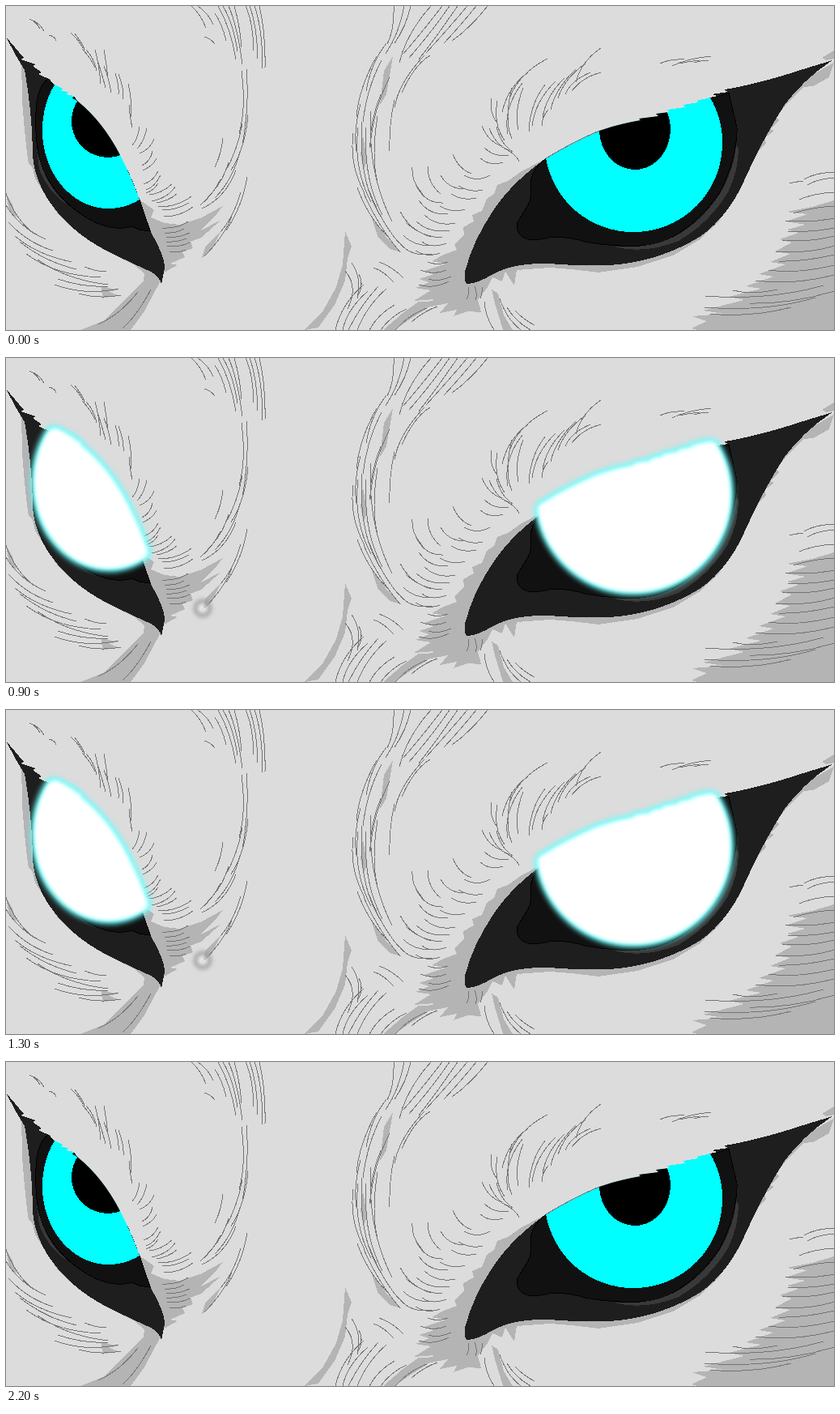
An HTML page that plays this animation: 1023 px wide and 400 px high, repeating every 2300 ms.

```html
<!DOCTYPE html>
<html lang="en">
<head>
<meta charset="utf-8">
<title>Glowing eyes</title>
<style>
  html, body { margin: 0; width: 100%; height: 100%; overflow: hidden; background: #dcdcdc; }
  svg { display: block; }
  .art { shape-rendering: crispEdges; }
  .shade { fill: #b4b4b4; }
  .fur { fill: none; stroke: #747474; }
  .socket { fill: #1e1e1e; }
  .inner { fill: #111; stroke: #000; }
  .rim { fill: #393939; }
  .iris { fill: #0ff; }
  .glow { stroke-linejoin: round; }
</style>
</head>
<body>
<svg width="1023" height="400" viewBox="0 0 1023 400">
  <defs>
    <filter id="flash1" filterUnits="userSpaceOnUse" x="0" y="0" width="1023" height="400" color-interpolation-filters="sRGB">
      <feComponentTransfer class="brighten"/>
    </filter>
    <filter id="flash2" filterUnits="userSpaceOnUse" x="0" y="0" width="1023" height="400" color-interpolation-filters="sRGB">
      <feComponentTransfer class="brighten"/>
      <feComponentTransfer class="brighten"/>
    </filter>
    <path id="leftIris" d="M60 97A82 97 0 0 0 165 239Q155 211 141 184Q120 143 88 117L82 114 84 111 75 109 77 106 68 105 70 102Z"/>
    <path id="rightIris" d="M667 188A109 110 0 0 0 776 279A109 110 0 0 0 870 113L853 117 855 119 837 122 839 125 817 128 819 131 803 133 806 136 782 139 784 141Q755 146 733 154Q700 168 667 188Z"/>
    <clipPath id="leftClip"><use href="#leftIris"/></clipPath>
    <clipPath id="rightClip"><use href="#rightIris"/></clipPath>
  </defs>
  <g id="scene">
    <rect width="1023" height="400" fill="#dcdcdc"/>
    <g class="art">
      <g class="shade">
        <path d="M0 42L18 66Q20 90 20 118Q24 170 28 195L33 200 36 213 62 254 75 268 96 284 130 305 159 320 171 330 170 339 157 353 135 374 122 388 92 400H154L171 377 184 352 192 338 182 310 120 270 60 220 35 140 26 78Z"/>
        <path d="M165 239L183 252 179 261 196 268 214 270 240 262 268 247 257 261 239 278 266 264 241 286 228 291 231 299 218 304 221 310 203 318 212 320 195 329Z"/>
        <path d="M266 277L247 296 242 311 255 299ZM0 232L8 245 14 263 4 252ZM118 346L140 351 126 352 138 357 119 361Z"/>
        <path d="M419 278L427 297 422 312 419 339 406 369 386 397 369 400 392 376 408 347 416 319Z"/>
        <path d="M478 62L467 80 462 122 470 109ZM452 262L473 289 488 304 474 300 459 284ZM441 159L446 190 442 203 438 184Z"/>
        <path d="M662 191L637 204 620 216 607 221 603 232 594 238 588 253 576 258 578 266 565 273 566 282 554 294 557 301 541 307 526 315 543 318 516 327 528 331 510 337 523 341 506 348 525 351 504 364 529 362 515 373 546 367 536 379 557 375 553 383 570 377 587 378 583 363 595 347 601 335 613 340 617 328 628 345 631 326 672 323 699 325 732 329 780 322 824 308 856 289 884 263 760 300 600 315Z"/>
        <path d="M510 365L489 380 466 400H480L500 386 535 364ZM600 350L604 367 614 400H626L615 382 608 355Z"/>
        <path d="M1023 70L1017 88 997 99 985 100 963 123 952 137 955 141 944 152 949 154 937 163 939 169 928 180 917 185 913 203 898 233 894 235 900 210 924 170 949 130 985 91Z"/>
        <path d="M1023 55L1008 64 1014 67 1023 65Z"/>
        <path d="M1023 240L996 248 964 254 990 257 963 266 988 270 965 276 979 280 956 288 971 292 950 303 969 306 944 316 963 319 930 331 948 334 914 346 933 349 893 359 912 363 861 376 887 380 847 383 866 389 847 398 855 400H1023Z"/>
      </g>
      <g class="fur">
        <!-- left brow and inner corner -->
        <path d="M29 16q8 3 13 12M34 18q9 5 13 13M53 36q7 1 9 7M80 33q10 9 15 19M85 34q11 14 12 21M94 53q10 10 16 23M99 54q10 11 13 26M110 54q5 18 7 42M114 70q6 19 9 31M121 54q3 17 5 35M121 74q6 15 9 33M135 83q5 16 4 26M139 84q7 18 6 31M151 96q5 20 3 41M152 122q1 16 4 28M165 149q-2 15-9 23M174 151q-4 18-12 25M183 164q-5 13-18 18M181 179q-2 12-13 18M186 188q-4 9-17 15"/>
        <path d="M188 204q-6 12-18 16M191 209q-8 15-18 18M188 219q-6 9-15 12M205 220q-14 12-28 13M209 223q-9 14-29 18M211 232q-11 9-25 11M229 235q-17 13-41 13M226 243q-15 9-33 9M231 248q-16 12-36 12M225 266q-11 9-32 8M220 275q-10 6-24 5M227 280q-15 7-29 5M223 287q-13 5-25 4M227 292q-16 7-28 4M222 301q-9 4-20 2"/>
        <!-- forehead, left side -->
        <path d="M229 0q12 11 18 27M237 0q14 10 19 23M245 38q8 2 13 9M258 9q9 13 14 34M262 0q16 28 22 66M268 0q13 22 18 56M275 0q11 25 17 72M282 0q7 24 9 51M296 0q9 19 10 55M301 0q9 24 10 65M307 0q10 28 10 77M313 0q8 34 7 76M291 80q6 44-3 78M297 78q4 45-5 93M299 134q-3 41-21 69M292 145q-6 34-22 61M268 163q-2 20-10 36M289 180q-9 35-31 57M275 193q-8 27-26 43M284 203q-13 34-42 47M265 214q-10 20-25 32M298 211q-6 37-26 66M290 230q-8 29-25 49M279 260q-10 25-34 49"/>
        <!-- forehead, right side -->
        <path d="M479 0q1 29-8 47M492 0q-6 34-23 59M500 0q-6 26-20 46M525 0q-30 33-39 70M539 0q-23 30-48 59M548 0q-22 32-50 64M558 0q-23 34-48 66M570 0q-27 32-51 58M581 0q-21 26-40 46M595 0q-21 27-44 43M517 61q-31 32-37 64M524 61q-20 12-35 46M480 116q-7 30-6 63"/>
        <path d="M470 46q-19 24-25 59M464 67q-18 34-23 76M458 62q-22 39-25 75M474 88q-21 41-24 86M463 109q-14 35-13 66M438 121q-9 33-5 58M429 157q-5 39 14 74M435 150q-6 51 16 92M440 143q-5 72 22 115M445 150q-4 63 20 108M451 130q-5 75 26 136M459 136q-8 50 0 82M434 224q13 36 37 60M442 231q17 40 45 73M449 229q15 39 37 64"/>
        <!-- between nose and right eye -->
        <path d="M502 199q-1 19 13 33M521 198q0 21 16 34M507 222q11 22 33 21M552 183q7 18 23 24M537 209q9 16 28 17M566 209q16 9 32 0M559 222q15 9 30 5M510 240q14 20 36 16M550 232q14 9 31 5M517 258q16 15 38 10M487 254q13 24 38 31M494 267q18 18 45 19M507 266q16 15 41 11M491 283q14 15 38 12M485 291q15 20 42 15M514 291q12 9 30 2M536 247q15 9 31 4M506 302q15 9 30 3M521 316q12 5 25 0M512 326q16 7 32 0M522 337q12 4 28-3M510 344q17 6 37-4"/>
        <!-- right brow -->
        <path d="M669 65q-35 18-46 47M645 82q-25 18-32 49M638 95q-24 31-18 63M600 114q-3 18 6 29M607 117q-5 30 9 49M625 101q-10 40 0 63M639 101q-11 27-6 52M588 148q8 20 25 25M597 151q9 22 24 27M606 149q5 21 20 31M591 175q12 12 30 9M586 188q12 10 28 5M618 177q12 6 16 15M735 52q-24 16-31 42M716 71q-26 18-34 43M704 78q-26 25-31 50M690 89q-22 21-27 48M679 93q-25 24-29 55M666 97q-19 25-20 58M735 82q-23 6-36 23M722 82q-24 10-31 27M670 128q-8 9-8 20"/>
        <path d="M808 71q13-6 30-5M823 74q18-9 48-12M832 71q14-3 25-4M850 70q10-3 18-3"/>
        <!-- right cheek -->
        <path d="M1023 205q-24 1-37 9M985 217q-9-1-17 2M1023 212q-22 2-33 9M1023 230q-24 1-43 9M1023 247q-25 1-50 9M1023 262q-28 6-60 3M1023 274q-28 6-57 4M1023 284q-30 8-64 5M1023 296q-30 10-72 7M1023 307q-37 9-69 8M1023 320q-45 11-81 6M1023 332q-50 13-97 7M1010 345q-68 19-146 13M1000 360q-60 18-137 12M970 372q-51 13-100 8M1023 352q-51 16-105 15M953 350q-31 7-55 1"/>
        <!-- left cheek -->
        <path d="M0 231q10 30 34 50M0 246q16 27 49 42M3 267q23 25 55 35M11 284q27 23 70 32M17 291q31 25 70 34M25 306q36 27 92 29M39 313q36 25 87 31M60 344q38 14 79 5M64 337q33 11 62 9M90 355q25 7 52 2M97 322q15 6 27 6M163 353q-22 28-49 40M179 350q-17 32-35 48"/>
        <!-- muzzle -->
        <path d="M427 317q13 18 7 44M419 327q17 20 3 47M436 331q7 13-2 28M442 344q-28 24-35 56M447 352q-26 23-31 48M460 346q-23 25-37 54M470 349q-24 21-36 51M480 369q-21 12-31 31M495 374q-20 9-32 26M520 373q-22 8-39 27M533 371q-17 6-32 19M454 323q14 5 25 18M461 316q17 6 30 20M571 347q2 9-2 15M579 346q4 9 1 17M588 347q1 8-2 14M610 361q8 25 26 39M619 372q10 17 29 28M629 376q10 11 24 18M591 365q1 18 12 35"/>
      </g>
      <!-- left eye -->
      <path class="socket" d="M0 38L22 64 18 66 37 72 33 74 44 82 40 84 55 91 53 94 60 97 70 102 68 105 77 106 75 109 84 111 88 117Q120 143 141 184Q157 214 165 239L180 281Q197 311 196 324L192 343Q189 333 179 328Q154 317 124 302Q76 277 50 236Q33 207 33 180Q32 129 23 79L11 59Z"/>
      <path class="inner" d="M52 90Q38 100 37 130Q35 176 46 203Q64 239 96 259Q122 276 145 274Q158 271 164 276L178 278 165 239 88 130Z"/>
      <path class="rim" d="M38 176Q45 212 67 237L78 247Q51 229 41 201Z"/>
      <use class="iris" href="#leftIris"/>
      <circle cx="126" cy="142" r="45" clip-path="url(#leftClip)"/>
      <!-- right eye -->
      <path class="socket" d="M1021 67L985 78Q940 93 895 102L887 103 892 106 872 109 879 111 870 113 853 117 855 119 837 122 839 125 817 128 819 131 803 133 806 136 782 139 784 141Q755 146 733 154Q700 168 667 188Q626 217 603 251Q577 289 567 328Q566 344 571 343Q583 342 600 332Q626 317 670 318Q706 321 744 320Q804 317 857 285Q890 262 910 220Q936 162 962 122Q986 90 1021 67Z"/>
      <path class="inner" d="M666 189Q652 198 648 217Q651 238 643 249L632 267Q629 283 645 288Q658 290 674 285Q696 285 715 291Q766 300 805 294Q854 274 883 228Q904 185 903 150L893 107 860 118Z"/>
      <path class="rim" d="M902 171Q900 201 882 232Q850 280 804 293Q780 299 752 297Q788 307 831 290Q870 267 892 230Q905 203 905 176Z"/>
      <use class="iris" href="#rightIris"/>
      <ellipse cx="777" cy="152" rx="44" ry="50" clip-path="url(#rightClip)"/>
      <path class="fur" d="M667 188Q700 168 733 154"/>
    </g>
    <g class="glow" id="halo"><use href="#leftIris"/><use href="#rightIris"/></g>
    <g class="glow" id="core"><use href="#leftIris"/><use href="#rightIris"/></g>
  </g>
  <g id="spark" style="filter: blur(2px)">
    <circle cx="243" cy="309" r="9" fill="none" stroke="#999" stroke-width="6"/>
    <circle id="sparkCore" cx="243" cy="309" r="5" fill="#f4f4f4"/>
  </g>
</svg>
<script>
const FRAME = 100, FRAMES = 23, PEAK = 11;
const byId = id => document.getElementById(id);
const [scene, halo, core, spark, sparkCore] = ['scene', 'halo', 'core', 'spark', 'sparkCore'].map(byId);

// Interpolates between [step, value] keys.
function track(keys, step) {
  const i = keys.findIndex(key => key[0] >= step);
  if (i < 0) return keys[keys.length - 1][1];
  if (i === 0) return keys[0][1];
  const [s0, v0] = keys[i - 1], [s1, v1] = keys[i];
  return v0 + (v1 - v0) * (step - s0) / (s1 - s0);
}

const HALO_GROWTH = [[0, 0], [4, 4], [6, 7.5], [9, 14]];
const CORE_GROWTH = [[6, 0], [9, 10]];
const WHITENESS = [[0, 0], [4, 0.4], [6, 0.92], [7, 1]];
const BRIGHTEN = '0 .22 .46 .69 .83 .9 .945 .994 1';

for (const transfer of document.querySelectorAll('.brighten')) {
  for (const channel of 'RGB') {
    const func = document.createElementNS('http://www.w3.org/2000/svg', 'feFunc' + channel);
    func.setAttribute('type', 'table');
    func.setAttribute('tableValues', BRIGHTEN);
    transfer.append(func);
  }
}

function paint(layer, red, growth, blur, opacity) {
  const color = `rgb(${Math.round(255 * red)},255,255)`;
  layer.style.cssText = `fill:${color};stroke:${color};stroke-width:${2 * growth}px;` +
    `filter:blur(${blur}px);opacity:${opacity}`;
}

function draw(step) {
  const growth = track(HALO_GROWTH, step);
  const white = track(WHITENESS, step);
  const shown = Math.min(1, step / 4);
  paint(halo, Math.min(0.4, white), growth, 1.5 + growth / 8, shown);
  paint(core, white, track(CORE_GROWTH, step), 2.2, shown);
  spark.style.opacity = track([[4, 0], [6, 0.12], [9, 0.65]], step);
  sparkCore.style.opacity = track([[6, 0], [9, 1]], step);
  const flash = Math.max(0, step - 9);
  scene.style.filter = flash ? `url(#flash${flash})` : 'none';
}

let lastStep = -1;
function tick() {
  const frame = Math.floor(performance.now() / FRAME) % FRAMES;
  const step = PEAK - Math.abs(frame - PEAK);
  if (step !== lastStep) draw(lastStep = step);
  requestAnimationFrame(tick);
}
tick();
</script>
</body>
</html>
```
